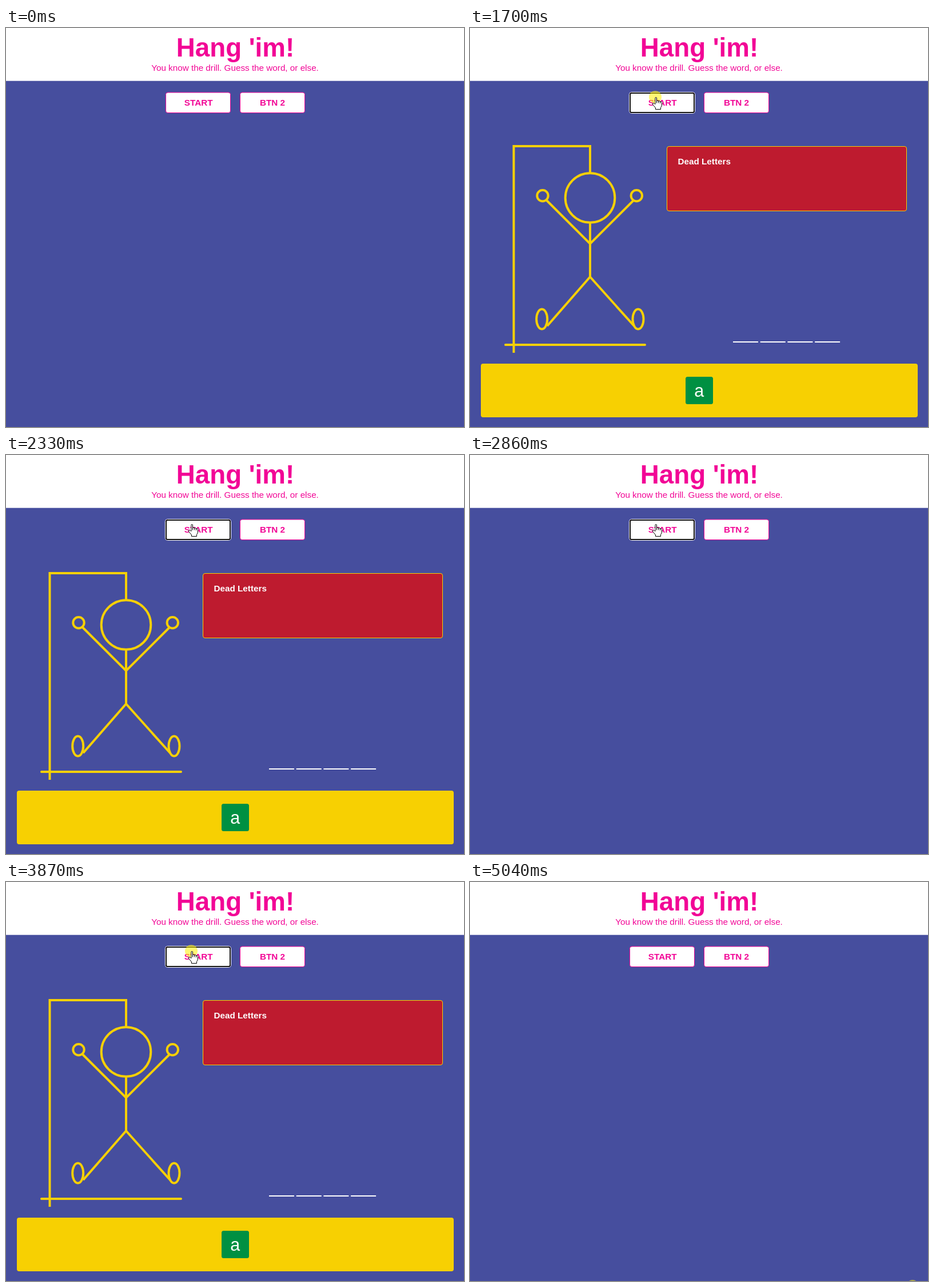
An HTML page that plays this animation: 801 by 699 pixels, repeating every 5.19 s.

```html
<!DOCTYPE html>
<html lang="en">
<head>
<meta charset="utf-8">
<title>Hang 'im!</title>
<style>
  html, body { margin: 0; width: 100%; height: 100%; overflow: hidden; background: #464e9e; }
  svg { display: block; width: 100vw; height: 100vh; }
  text { font: 15.25px "Liberation Sans", Arial, sans-serif; text-anchor: middle; fill: #f20696; }
  .bold { font-weight: bold; }
  .btn { fill: #fff; stroke: #f20696; }
  .man { fill: none; stroke: #f7d002; stroke-width: 4; }
  .ptr { fill: #fff; stroke: #000; stroke-linejoin: round; }
</style>
</head>
<body>
<svg viewBox="0 0 801 699">
  <rect width="801" height="699" fill="#464e9e"/>
  <rect width="801" height="92.7" fill="#fff"/>
  <text class="bold" x="401" y="50" style="font-size:45.7px">Hang 'im!</text>
  <text x="400.5" y="75">You know the drill. Guess the word, or else.</text>

  <rect class="btn" x="279.5" y="113" width="113" height="35.5" rx="3.5"/>
  <rect class="btn" x="409.5" y="113" width="113" height="35.5" rx="3.5"/>
  <g id="ring" fill="none">
    <rect x="278.5" y="112.5" width="115" height="37" rx="4" stroke="#fff"/>
    <rect x="280" y="114" width="112" height="34" rx="2.5" stroke="#101010" stroke-width="2"/>
  </g>
  <text class="bold" x="336.7" y="136">START</text>
  <text class="bold" x="466" y="136">BTN 2</text>

  <g id="board">
    <g class="man">
      <path d="M76.5 569V207H210V254M210 341V436M133 301L210 378L287 301M135 522L210 436L287 522"/>
      <path d="M62 555H306" stroke-linecap="round"/>
      <circle cx="210" cy="297.5" r="43.3"/>
      <circle cx="127" cy="293.7" r="9.7"/>
      <circle cx="291.3" cy="293.7" r="9.7"/>
      <ellipse cx="125.7" cy="510" rx="9.5" ry="17.5"/>
      <ellipse cx="294" cy="510" rx="9.5" ry="17.5"/>
    </g>
    <rect x="344.5" y="207.5" width="419" height="113" rx="3.5" fill="#be1b2f" stroke="#f7d002"/>
    <text class="bold" x="363.5" y="239" style="text-anchor:start;fill:#fff">Dead Letters</text>
    <path d="M460 550H648" stroke="#fff" stroke-width="2" stroke-dasharray="44 3.7"/>
    <rect x="19" y="588" width="764" height="94" rx="4" fill="#f7d002"/>
    <rect x="377" y="611" width="48" height="48" rx="3.5" fill="#009042"/>
    <text x="400.7" y="646" style="font-size:30.5px;fill:#fff">a</text>
  </g>

  <circle id="glow" r="11" fill="#fff000" fill-opacity=".54"/>
  <path id="arrow" class="ptr" d="M.5 .7V16.5L4.2 13L6.6 18.4L9 17.4L6.6 12.2H11.6Z"/>
  <g id="hand" class="ptr">
    <path d="M0 12.5V1.8Q0 .5 1.2 .5T2.5 1.8V6.5Q5.5 5.4 5.5 7Q8.5 6.2 8.5 8Q11.5 7.4 11.5 9.5V15L9.5 18.5V21.5H.5V19L-4 13.5Q-5.2 11.5 -4 10.8T-1.5 11.5Z"/>
    <path d="M2.5 6.5V10.5M5.5 7V10.5M8.5 8V11" fill="none"/>
  </g>
</svg>
<script>
const LOOP = 5190, TICK = 77.8, LEAD = 35;
const FIRST = 15, BEAT = 7, CLICKS = 6, LEAVE = 65;

// Key points of the pointer: tick, x, y
const path = [
  [2, 772, 690], [8, 370, 161], [13, 324, 114.5],
  [FIRST + 1, 324, 114.5], [20, 324, 121],
  [51, 324, 121], [56, 591, 579], [63, 755, 701], [LEAVE, 774, 708],
];

const el = id => document.getElementById(id);
const show = (id, on) => el(id).style.display = on ? "" : "none";
const clamp = (v, lo, hi) => Math.max(lo, Math.min(hi, v));
const smooth = u => u * u * (3 - 2 * u);

function pointerAt(tick) {
  if (tick < path[0][0]) return path.at(-1).slice(1);
  const i = path.findLastIndex(p => p[0] <= tick);
  const [start, ...from] = path[i];
  const [end, ...to] = path[i + 1] || [start + 1, ...from];
  const u = smooth(clamp((tick - start) / (end - start), 0, 1));
  return from.map((v, k) => v + (to[k] - v) * u);
}

function draw() {
  const tick = Math.floor((performance.now() % LOOP + LEAD) / TICK);
  const [x, y] = pointerAt(tick);
  const hover = x > 279 && x < 393 && y > 113 && y < 149;

  // One press every beat, released a tick later; each release flips the board.
  const since = tick - FIRST;
  const pressed = since >= 0 && since < BEAT * CLICKS && since % BEAT === 0;
  const released = clamp(Math.ceil(since / BEAT), 0, CLICKS);

  show("hand", hover);
  show("arrow", !hover);
  show("glow", pressed || tick >= LEAVE);
  show("board", released % 2);
  show("ring", released && tick < LEAVE);
  for (const id of ["hand", "arrow", "glow"])
    el(id).setAttribute("transform", `translate(${x} ${y})`);
  requestAnimationFrame(draw);
}
draw();
</script>
</body>
</html>
```
